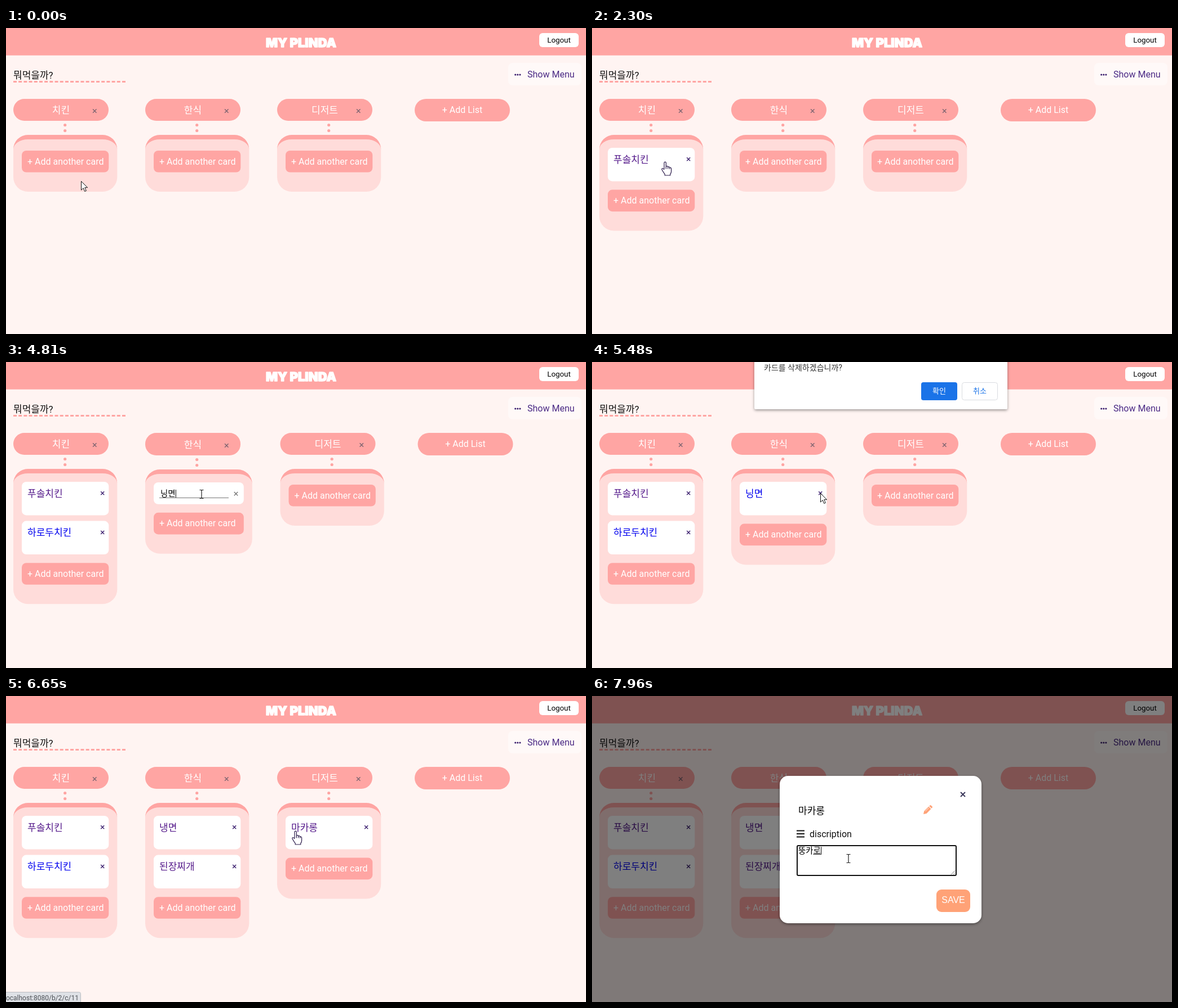
An HTML page for the animation above (8 s loop, 1029 px wide and 544 px high).

```html
<!DOCTYPE html>
<html lang="ko">
<head>
<meta charset="utf-8">
<style>
html, body { margin: 0; width: 100%; height: 100%; overflow: hidden; background: #fff4f2; }
svg { display: block; width: 1029px; height: 544px; font: 16px Roboto, 'Noto Sans CJK KR', 'Noto Sans CJK', sans-serif; }
.title { font: 900 22px Inter, sans-serif; stroke: #fff; stroke-width: 1.5px; stroke-linejoin: round; }
.arial { font-family: 'Liberation Sans', Arial, sans-serif; }
</style>
</head>
<body>
<svg id="stage" viewBox="0 0 1029 544"></svg>
<script>
const LOOP = 8000, PINK = '#ffa5a3', VISITED = '#551a8b', LINK = '#0000ee';
const HANGUL = 17, INPUT = 14.4, ADVANCE = INPUT * 0.92, CARD = 69.6, FORM = 48.8;

const rect = (x, y, w, h, r, fill, more = '') =>
  `<rect x="${x}" y="${y}" width="${w}" height="${h}" rx="${r}" fill="${fill}" ${more}/>`;
const text = (x, y, s, fill, size = 16, more = '') =>
  `<text x="${x}" y="${y}" fill="${fill}" font-size="${size}" ${more}>${s}</text>`;
const path = (d, stroke, width = 1, more = 'fill="none"') =>
  `<path d="${d}" stroke="${stroke}" stroke-width="${width}" ${more}/>`;
const dot = (x, y, r, fill) => `<circle cx="${x}" cy="${y}" r="${r}" fill="${fill}"/>`;
const cross = (x, y, r, color, w = 1.4) =>
  path(`M${x - r} ${y - r}l${2 * r} ${2 * r}m0 ${-2 * r}l${-2 * r} ${2 * r}`, color, w);
const MIDDLE = 'text-anchor="middle"';
const within = (t, a, b) => t >= a && t < b;

// Typed text: each state of the syllable being composed, with its time
const typing = {
  first: [[1360, 'ㅍ'], [1440, '푸'], [1510, '풋'], [1590, '푸소'], [1760, '푸솔'], [1840, '푸솔ㅊ'],
    [1920, '푸솔치'], [2070, '푸솔칰'], [2150, '푸솔치키'], [2220, '푸솔치킨']],
  second: [[2740, 'ㅎ'], [2820, '하'], [2890, '할'], [2970, '하로'], [3050, '하롣'], [3130, '하로두'],
    [3210, '하로둧'], [3290, '하로두치'], [3380, '하로두칰'], [3460, '하로두치키'], [3540, '하로두치킨']],
  noodle: [[4430, 'ㄴ'], [4510, '니'], [4580, '닝'], [4660, '닝ㅁ'], [4730, '닝며'], [4810, '닝면']],
  note: [[7430, 'ㄸ'], [7500, '뚜'], [7580, '뚱'], [7650, '뚱ㅋ'], [7800, '뚱카'], [7880, '뚱칼'], [7960, '뚱카로']]
};
const typed = (steps, t) => steps.reduce((s, [at, v]) => t >= at ? v : s, '');

// Cards and open form of each list
function board(t) {
  const lists = [
    { name: '치킨', cards: [], form: null },
    { name: '한식', cards: [], form: null },
    { name: '디저트', cards: [], form: null }
  ];
  const [a, b, c] = lists;
  if (t >= 2300) a.cards.push(['푸솔치킨', VISITED]);
  if (t >= 3710) a.cards.push(['하로두치킨', LINK]);
  if (within(t, 530, 2300)) a.form = typed(typing.first, t);
  if (within(t, 2600, 3710)) a.form = typed(typing.second, t);
  if (within(t, 4290, 4890)) b.form = typed(typing.noodle, t);
  if (within(t, 4890, 6180)) b.cards.push(['닝면', LINK]);
  if (t >= 6340) b.cards.push(['냉면', VISITED]);
  if (within(t, 6340, 6420)) b.form = '된장찌개';
  if (t >= 6420) {
    b.cards.push(['된장찌개', VISITED]);
    c.cards.push(['마카롱', VISITED]);
  }
  return lists;
}

const caret = (x, y, s) => path(`M${x + ADVANCE * s.length + .8} ${y}v14`, '#000');

function drawList({ name, cards, form }, x, t) {
  const open = form !== null, dy = open ? 1 : 0;
  const w = open ? 189.8 : 184.3, inner = w - 30, n = cards.length;
  const grow = n * CARD + (open ? FORM - (form ? 0 : 1) : 0);
  const top = 190 + dy, flat = w - 52;
  let out = rect(x, 126, 169, 39 + dy, 19.5, PINK)
    + text(x + 84.5, 152 + dy, name, '#fff', HANGUL, MIDDLE)
    + cross(x + 144.3, 147.5 + dy, 3.2, '#7d6470')
    + dot(x + 91.7, 172.5 + dy, 2.6, PINK) + dot(x + 91.7, 182.5 + dy, 2.6, PINK)
    + rect(x, top, w, 101 + grow, 26, '#ffdcda')
    + path(`M${x} ${top + 26}a26 26 0 0 1 26-26h${flat}a26 26 0 0 1 26 26a26 18 0 0 0-26-18h${-flat}a26 18 0 0 0-26 18z`,
      'none', 0, `fill="${PINK}"`);
  cards.forEach(([label, color], i) => {
    const y = 213 + dy + i * CARD;
    out += rect(x + 15, y, inner, 59.4, 8, '#fff')
      + text(x + 25, y + 26.5, label, color, HANGUL)
      + cross(x + 158.2, y + 20.3, 3, '#3b1f6e');
  });
  if (open) {
    const y = 213 + dy + n * CARD;
    out += rect(x + 15, y, inner, 38.8, 8, '#fff')
      + text(x + 27, y + 24.8, form, '#000', INPUT)
      + path(`M${x + 25} ${Math.round(y + 27) + .5}h123`, '#767676')
      + cross(x + 161, y + 20.3, 3.2, '#777');
    if (form || t >= 760) out += caret(x + 27, y + 13, form);
  }
  const y = 218 + dy + grow;
  return out + rect(x + 15, y, inner, 38.6, 8, PINK) + text(x + 25, y + 24.6, '+ Add another card', '#fff');
}

function drawPage(t) {
  let out = rect(0, 0, 1029, 544, 0, '#fff4f2') + rect(0, 0, 1029, 48.7, 0, PINK)
    + `<text class="title" x="523.5" y="33.5" fill="#fff" ${MIDDLE}>MY PLINDA</text>`
    + rect(946, 9, 70, 25, 6, '#fff') + text(981, 26, 'Logout', '#000', 13.33, MIDDLE)
    + text(13, 89.5, '뭐먹을까?', '#111', HANGUL)
    + path('M13 95.5h199', PINK, 3, 'stroke-dasharray="6 3.19"')
    + rect(891, 62, 130, 40, 8, '#fff9f8')
    + [903.7, 907.8, 911.9].map(x => dot(x, 83, 1.6, '#3b1f6e')).join('')
    + text(925, 87.5, 'Show Menu', '#4b2a85');
  let x = 13;
  for (const list of board(t)) {
    out += drawList(list, x, t);
    x += list.form === null ? 234 : 239.5;
  }
  return out + rect(x + 10, 126, 169, 40, 20, PINK) + text(x + 94.5, 151, '+ Add List', '#fff', 16, MIDDLE);
}

const drawDialog = opacity => `<g opacity="${opacity}">`
  + rect(288, -20, 449, 104, 3, '#fff', 'filter="url(#shadow)"')
  + text(305, 14.5, '카드를 삭제하겠습니까?', '#333', 14)
  + rect(584, 36, 64, 32, 4, '#1a73e8') + text(616, 56, '확인', '#fff', 13, MIDDLE)
  + rect(656.5, 36.5, 63, 31, 4, '#fff', 'stroke="#dadce0"') + text(688, 56, '취소', '#1a73e8', 13, MIDDLE)
  + '</g>';

function drawModal(t) {
  const edit = t >= 7280, y = edit ? 142 : 152, bottom = edit ? 404 : 394;
  const note = typed(typing.note, t);
  let out = rect(0, 0, 1029, 544, 0, '#000', 'opacity=".5"')
    + rect(333, y, 358, bottom - y, 15, '#fff', 'filter="url(#shadow)"')
    + cross(658, y + 33, 4, '#3d3a5c', 2)
    + text(366, y + 67.5, '마카롱', '#000', HANGUL)
    + `<g transform="translate(588 ${y + 52})" fill="#ffa277"><path d="M0 16l1.2-5.3L9.3 2.6l4.2 4.2-8.1 8.1zM10.3 1.7l1.2-1.2q1-.9 2 0l2.1 2.1q.9 1 0 2l-1.2 1.2z"/><path d="M3.5 10.8l6-6" stroke="#fff" stroke-width=".8"/></g>`
    + path(`M363 ${y + 97.5}h14m-14 5.5h14m-14 5.5h14`, '#111', 2.2)
    + text(386, y + 108.5, 'discription', '#111');
  if (edit) {
    out += rect(364, 266, 282, 53, 2, '#fff', 'stroke="#101010" stroke-width="2"')
      + text(366, 279.8, note, '#000', INPUT) + caret(366, 268, note)
      + path('M637 317.5l7-7m-3 7l3-3', '#777');
    if (note) out += path(`M${366 + ADVANCE * (note.length - 1)} 281.5h${ADVANCE}`, '#000');
  } else {
    out += rect(363, 275, 288, 39.5, 8, '#fdeee2')
      + text(373, 298, 'Add description', '#757575', 16, 'class="arial"');
  }
  return out + rect(611, bottom - 60, 60, 40, 9, '#ffa277')
    + text(641, bottom - 36, 'SAVE', '#fff', 16, MIDDLE + ' class="arial"');
}

// Link shown at the bottom while a card is hovered: from, to, card id
const hovers = [[2370, 2520, 6], [3800, 4140, 7], [4890, 5270, 8], [6420, 6500, 10], [6650, 7030, 11]];
function drawStatus(t) {
  const hover = hovers.find(([a, b]) => within(t, a, b));
  if (!hover) return '';
  const w = hover[2] > 9 ? 133 : 126;
  return rect(-5, 526.5, w + 4.5, 25, 3, '#dee1e6', 'stroke="#b9bcc1"')
    + text(-3, 541, 'localhost:8080/b/2/c/' + hover[2], '#4d5156', 12);
}

// Pointer path: time, x, y, shape (a arrow, h hand, i text beam)
const track = [
  [0, 133, 272, 'a'], [380, 133, 272, 'a'], [460, 133, 251, 'h'], [530, 133, 251, 'a'], [750, 133, 251, 'a'],
  [840, 131, 240, 'i'], [990, 130, 232, 'i'], [1360, 130, 232, 'i'], [1590, 130, 238, 'i'],
  [2290, 130, 238, 'h'], [2350, 130, 238, 'h'], [2440, 120, 262, 'h'], [2515, 95, 280, 'a'],
  [2590, 67, 304, 'h'], [2670, 67, 304, 'i'], [3800, 67, 304, 'h'], [3980, 67, 304, 'h'], [4060, 130, 290, 'h'],
  [4140, 220, 265, 'a'], [4210, 300, 240, 'h'], [4280, 347, 235, 'h'], [4360, 347, 235, 'i'],
  [4885, 347, 235, 'h'], [5040, 395, 234, 'h'], [5200, 405, 233, 'h'], [5480, 405, 233, 'a'],
  [5560, 430, 200, 'a'], [5800, 560, 90, 'a'], [5960, 583, 64, 'a'], [6330, 583, 64, 'a'],
  [6331, 400, 300, 'i'], [6415, 400, 300, 'h'], [6490, 419, 240, 'a'], [6560, 450, 240, 'a'],
  [6640, 530, 240, 'h'], [6730, 539, 235, 'h'], [6880, 539, 235, 'a'], [7000, 539, 235, 'a'],
  [7200, 455, 289, 'i'], [LOOP, 455, 289, 'i']
];
const pointers = {
  a: path('M.5.5v15.6l3.7-3.5 2.5 5.9 2.6-1.1-2.5-5.7h4.8z', '#111', 1, 'fill="#fff"'),
  h: path('M-2 13V1.7q.1-1.5 1.7-1.5t1.7 1.5V8q3-1.2 3.3 1 2.7-1 3 1.2 2.9-.6 2.9 2v5q0 2.5-1.8 4.6V24H-.8v-2.2Q-3.8 18-6 13.7q-.4-2 1.4-2.2 1 0 2.6 2.3M1.4 8v4.5m3.3-3.5v3.5m3-2.3v2.6', '#2a1a4a', 1.2, 'fill="#fff" stroke-linejoin="round"'),
  i: path('M-3.5-7.5h2.5l1 1 1-1h2.5M0-6.5v13M-3.5 7.5h2.5l1-1 1 1h2.5', '#222', 1.2)
};
function drawPointer(t) {
  const frame = LOOP / 104;
  const q = Math.floor((t + 9) / frame) * frame + 9;
  const i = Math.max(1, track.findIndex(k => k[0] > q));
  const [t0, x0, y0] = track[i - 1], [t1, x1, y1] = track[i];
  const k = Math.min(1, Math.max(0, (q - t0) / (t1 - t0)));
  const shape = track.reduce((s, key) => t >= key[0] ? key[3] : s, 'a');
  return `<g transform="translate(${Math.round(x0 + (x1 - x0) * k)} ${Math.round(y0 + (y1 - y0) * k)})">${pointers[shape]}</g>`;
}

const DEFS = '<defs><filter id="shadow" x="-10%" y="-20%" width="120%" height="150%">'
  + '<feDropShadow dx="0" dy="2" stdDeviation="2.5" flood-opacity=".4"/></filter></defs>';
const stage = document.getElementById('stage');
let shown = '';

function render(t) {
  const html = DEFS + drawPage(t)
    + (within(t, 5480, 6260) ? drawDialog(t < 6180 ? 1 : .7) : '')
    + (t >= 6880 ? drawModal(t) : '')
    + drawStatus(t) + drawPointer(t);
  if (html !== shown) stage.innerHTML = shown = html;
}

const start = performance.now();
function tick() {
  render((performance.now() - start) % LOOP);
  requestAnimationFrame(tick);
}
tick();
</script>
</body>
</html>
```
